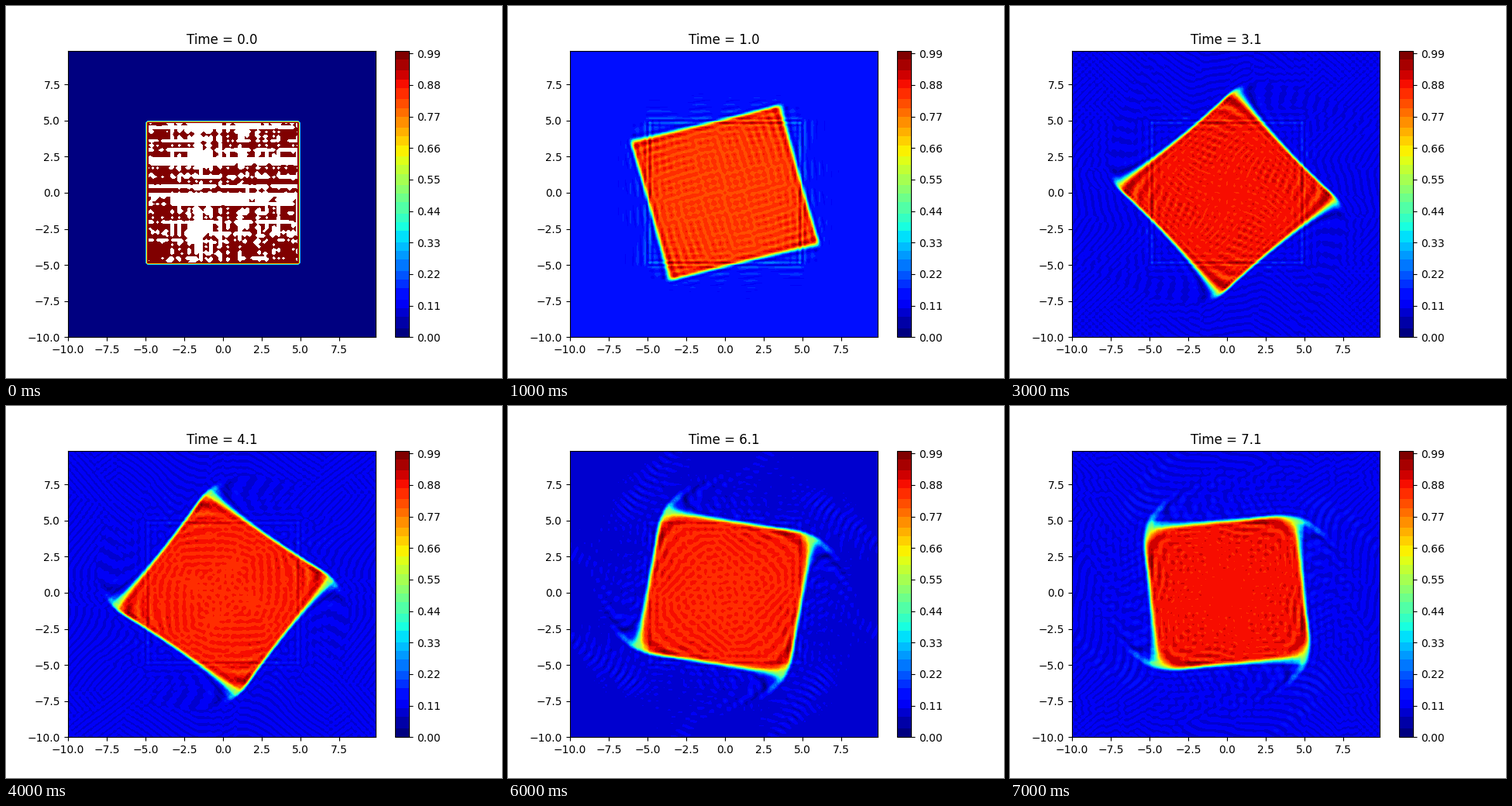
Write a matplotlib script that moves like this. It is 640x480 px and loops after 8000 ms.

```python
import numpy as np
import matplotlib.pyplot as plt
from matplotlib.animation import FuncAnimation

N, L = 128, 20.0
NU = 1e-3
FRAMES, STEP, SUBSTEPS = 8, 1.02, 34
DT = STEP / SUBSTEPS

x = -L / 2 + L / N * np.arange(N)
X, Y = np.meshgrid(x, x)
k = 2 * np.pi * np.fft.fftfreq(N, L / N)
KX, KY = np.meshgrid(k, k)
K2 = KX**2 + KY**2
INV_K2 = 1 / np.where(K2 == 0, 1, K2)
KMAX = np.abs(k).max()
KEEP = np.where(np.maximum(np.abs(KX), np.abs(KY)) < KMAX * 2 / 3, 1.0, 0.0)


def real(spec):
    return np.real(np.fft.ifft2(spec))


def slope(w):
    """Rate of change of the vorticity spectrum."""
    psi = w * INV_K2
    u, v = real(1j * KY * psi), real(-1j * KX * psi)
    flux = u * real(1j * KX * w) + v * real(1j * KY * w)
    return -KEEP * np.fft.fft2(flux) - NU * K2 * w


def advance(w):
    for _ in range(SUBSTEPS):
        a = slope(w)
        b = slope(w + DT / 2 * a)
        c = slope(w + DT / 2 * b)
        d = slope(w + DT * c)
        w = w + DT / 6 * (a + 2 * b + 2 * c + d)
    return w


square = ((np.abs(X) < 5) & (np.abs(Y) < 5)).astype(float)
spec = np.fft.fft2(square)
fields = [np.maximum(real(spec), 0)]
for _ in range(FRAMES - 1):
    spec = advance(spec)
    fields.append(real(spec))

fig, ax = plt.subplots(figsize=(6.4, 4.8), dpi=100)
cmap = plt.get_cmap("jet", 30)


def draw(i):
    ax.clear()
    ax.set_title(f"Time = {i * STEP:.1f}")
    levels = np.linspace(0, 1, 101) if i == 0 else 100
    return ax.contourf(X, Y, fields[i], levels, cmap=cmap)


fig.colorbar(draw(0), ax=ax)
anim = FuncAnimation(fig, draw, frames=FRAMES, interval=1000, repeat=True)
plt.show()
```
